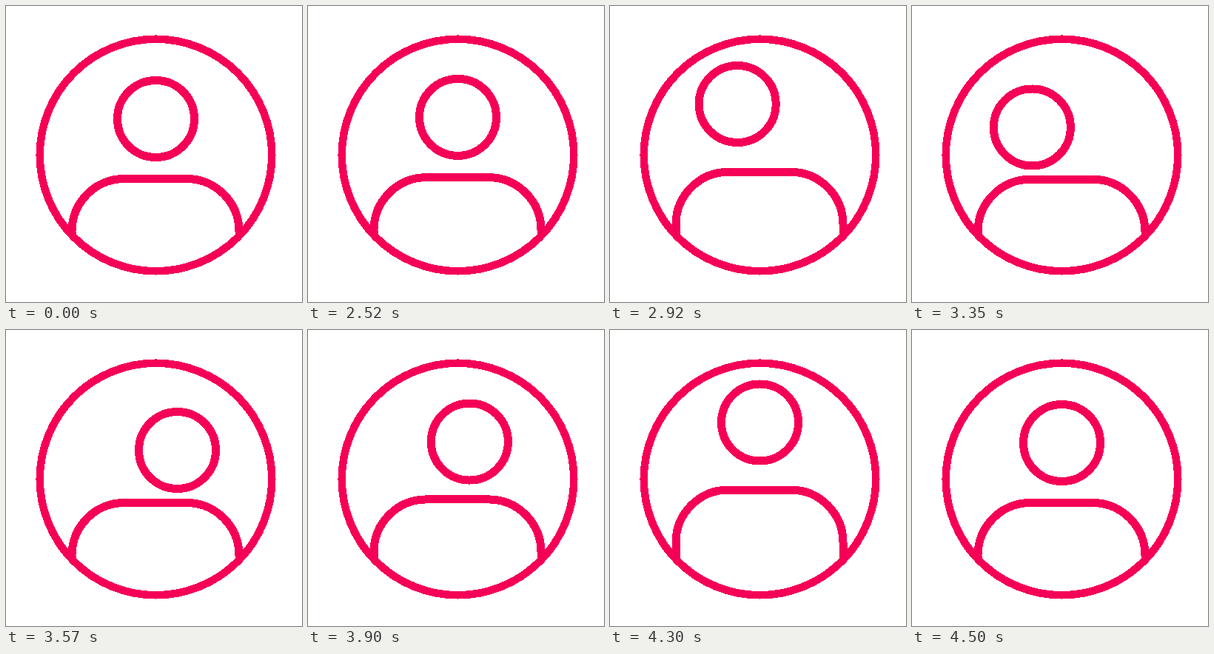
Write an HTML page that moves like this. It is 400 px wide and 400 px high and loops after 4.57 s.

```html
<!DOCTYPE html>
<html lang="en">
<head>
<meta charset="utf-8">
<title>Avatar</title>
<style>
  html, body { margin: 0; height: 100%; overflow: hidden; background: #fff; }
  svg { display: block; width: 100%; height: 100%; fill: none; stroke: #f50057; stroke-width: 11; shape-rendering: crispEdges; }
</style>
</head>
<body>
<svg viewBox="0 0 400 400">
  <circle cx="202.5" cy="201.5" r="156.8" stroke-width="10.5"/>
  <circle id="head" r="52"/>
  <path id="body"/>
</svg>
<script>
const LOOP = 4570;
const HOP = 2504, LAND = 3020, ROLL = 3330, RETURN = 3800, REST = 4500;
const head = document.getElementById('head');
const body = document.getElementById('body');

const linear = u => u;
const smooth = u => (1 - Math.cos(Math.PI * u)) / 2;

function draw() {
  const t = performance.now() % LOOP;
  const move = (distance, start, end, ease = smooth) =>
    distance * ease(Math.min(1, Math.max(0, (t - start) / (end - start))));

  const x = 202.5
    + move(-41.5, 2735, LAND)
    + move(70.5, ROLL, 3570)
    + move(-29, RETURN, 4015);

  const y = 152.5
    + move(-43, HOP, 2850, linear) + move(54.5, 2840, LAND)
    + move(-1.5, ROLL, 3570)
    + move(-53.5, RETURN, 4130) + move(43.5, 4160, REST);

  // The shoulders push the head up, then sink slightly under its weight.
  const top = 233.5
    + move(-28.5, HOP, 2775, linear) + move(29.2, 2770, LAND)
    + move(-0.7, ROLL, 3570)
    + move(-26.5, RETURN, 4170) + move(26.5, 4170, REST);

  head.setAttribute('cx', x);
  head.setAttribute('cy', y);
  body.setAttribute('d', `M89 310V${top + 71}a71 71 0 0 1 71-71H244a71 71 0 0 1 71 71V310`);
  requestAnimationFrame(draw);
}
draw();
</script>
</body>
</html>
```
